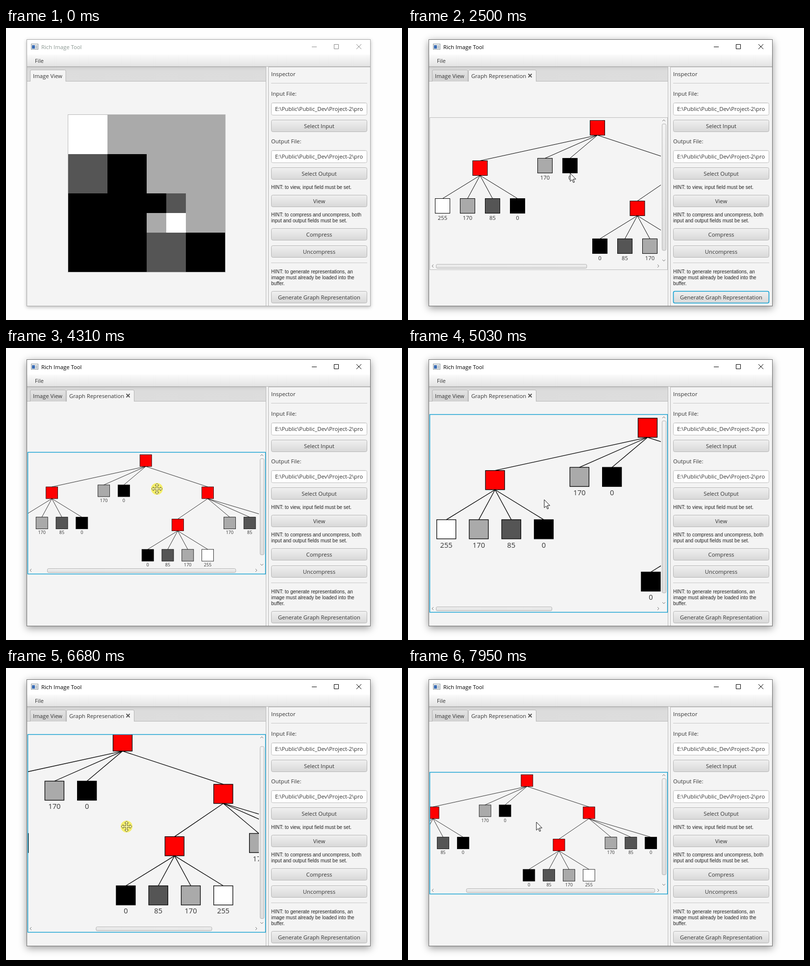
These frames come from a looping animation (808x595 px, 8000 ms). An HTML page:

```html
<!DOCTYPE html>
<html lang="en">
<head>
<meta charset="utf-8">
<title>Rich Image Tool</title>
<style>
  html, body { margin: 0; width: 100%; height: 100%; overflow: hidden; background: #fefefe; }
  #win { position: absolute; left: 42px; top: 23px; width: 702px; height: 544px; box-shadow: 0 2px 7px rgba(0,0,0,.27); }
  #win.active { box-shadow: 0 4px 15px rgba(0,0,0,.4); }
  svg { position: absolute; left: 0; top: 0; display: block; }
  text { font: 11.3px "Open Sans", "Noto Sans", sans-serif; fill: #333; white-space: pre; }
  .mid { text-anchor: middle; }
  .hint { font: 10px "Liberation Sans", Arial, sans-serif; fill: #222; }
  .edge { fill: none; stroke: #b7b7b7; }
  .thumb { fill: url(#thumb); stroke: #b4b4b4; }
  .tick { fill: none; stroke: #777; }
</style>
</head>
<body>
<div id="win"></div>
<svg id="stage" width="808" height="595" viewBox="0 0 808 595">
  <defs>
    <linearGradient id="menu" x2="0" y2="1"><stop stop-color="#fbfbfb"/><stop offset="1" stop-color="#e2e2e2"/></linearGradient>
    <linearGradient id="btn" x2="0" y2="1"><stop stop-color="#f0f0f0"/><stop offset="1" stop-color="#d8d8d8"/></linearGradient>
    <linearGradient id="hover" x2="0" y2="1"><stop stop-color="#f6f6f6"/><stop offset="1" stop-color="#e0e0e0"/></linearGradient>
    <linearGradient id="down" x2="0" y2="1"><stop stop-color="#dadada"/><stop offset="1" stop-color="#c5c5c5"/></linearGradient>
    <linearGradient id="tab" x2="0" y2="1"><stop stop-color="#e4e4e4"/><stop offset="1" stop-color="#d2d2d2"/></linearGradient>
    <linearGradient id="head" x2="0" y2="1"><stop stop-color="#d2d2d2"/><stop offset=".25" stop-color="#dcdcdc"/><stop offset="1" stop-color="#dddddd"/></linearGradient>
    <linearGradient id="thumb" x2="0" y2="1"><stop stop-color="#f2f2f2"/><stop offset="1" stop-color="#dedede"/></linearGradient>
    <clipPath id="field"><rect x="545" y="150" width="185.5" height="130"/></clipPath>
    <clipPath id="view"><rect id="viewBox" x="45" width="471"/></clipPath>
  </defs>

  <rect x="43" y="24" width="700" height="542" fill="#f4f4f4"/>
  <rect x="43" y="24" width="700" height="30" fill="#fff"/>
  <rect x="43" y="54" width="700" height="25" fill="url(#menu)"/>
  <path class="edge" d="M43 78.5H743"/>
  <rect x="51.5" y="32.5" width="14" height="11" fill="#f2f2f2" stroke="#8c979c"/>
  <rect x="53" y="35" width="6" height="7" fill="#3a6cb4"/>
  <rect x="60" y="35" width="4" height="7" fill="#c3cad0"/>
  <text id="title" x="72" y="43">Rich Image Tool</text>
  <path id="controls" fill="none" d="M624 38.5H634M669.5 33.5H678.5V42.5H669.5ZM715 33L725 43M725 33L715 43"/>
  <text x="59" y="71">File</text>

  <rect x="43" y="80" width="488" height="29" fill="url(#head)"/>
  <path class="edge" d="M43 108.5H531M43 79.5H531M530.5 79V566M535.5 79V566M535 79.5H743"/>
  <path id="tab1" d="M49.5 109V88Q49.5 85.5 52 85.5H119.5Q122 85.5 122 88V109" stroke="#b5b5b5"/>
  <text x="55" y="102">Image View</text>

  <g id="image"><rect x="126.5" y="176.5" width="321" height="321" fill="#aaa" stroke="#b9b9b9"/></g>

  <g id="graph">
    <path d="M123.5 109V88Q123.5 85.5 126 85.5H259Q261.5 85.5 261.5 88V109" fill="#f4f4f4" stroke="#b5b5b5"/>
    <text x="129" y="102">Graph Represenation</text>
    <path d="M245.5 93.5L252.5 100.5M252.5 93.5L245.5 100.5" stroke="#555" stroke-width="1.8"/>
    <g clip-path="url(#view)"><g id="tree"></g></g>
    <rect id="hThumb" class="thumb" height="8" rx="2.5"/>
    <rect id="vThumb" class="thumb" x="518.5" width="8" rx="2.5"/>
    <path id="ticks" class="tick"/>
    <rect id="pane" x="44.5" width="485" fill="none"/>
  </g>

  <g id="side"><path stroke="#c6c6c6" d="M541 112.5H737M541 478.5H737"/></g>
  <rect id="frame" x="42.5" y="23.5" width="701" height="543" fill="none"/>

  <g id="cursor">
    <circle id="halo" r="12" fill="#f5ee3c" opacity=".75"/>
    <path id="arrow" fill="#fff" stroke="#111" stroke-linejoin="round" d="M0 0V16.5L3.8 13L6.4 19L8.7 18L6.1 12H11.5Z"/>
    <path id="move" fill="#fbf7a2" stroke="#5a5632" stroke-width=".9" d="M0-11L4-7H1.5V-1.5H7V-4L11 0L7 4V1.5H1.5V7H4L0 11L-4 7H-1.5V1.5H-7V4L-11 0L-7-4V-1.5H-1.5V-7H-4Z"/>
  </g>
</svg>
<script>
const LOOP = 8000;
const $ = id => document.getElementById(id);

function add(parent, tag, attrs, content) {
  const el = document.createElementNS("http://www.w3.org/2000/svg", tag);
  set(el, attrs);
  if (content !== undefined) el.textContent = content;
  parent.appendChild(el);
  return el;
}
function set(el, attrs) {
  for (const k in attrs) el.setAttribute(k, attrs[k]);
}
const show = (el, on) => { el.style.display = on ? "" : "none"; };

// Inspector
const side = $("side");
function label(text, y) { add(side, "text", { x: 541, y }, text); }
function hint(y, ...lines) {
  lines.forEach((s, i) => add(side, "text", { x: 541, y: y + 12 * i, class: "hint" }, s));
}
function button(text, y) {
  add(side, "rect", { x: 541.5, y: y + 1.5, width: 195, height: 24, rx: 3, fill: "none", stroke: "#fff", opacity: .7 });
  const box = add(side, "rect", { x: 541.5, y: y + .5, width: 195, height: 24, rx: 3, fill: "url(#btn)", stroke: "#b5b5b5" });
  add(side, "text", { x: 639, y: y + 17, class: "mid" }, text);
  return box;
}
function field(y) {
  add(side, "rect", { x: 541.5, y: y + .5, width: 195, height: 25, rx: 3, fill: "#fff", stroke: "#bebebe" });
  add(side, "path", { d: `M543 ${y + 1.5}H735`, stroke: "#ececec" });
  add(side, "text", { x: 549, y: y + 17, "clip-path": "url(#field)" }, "E:\\Public\\Public_Dev\\Project-2\\pro");
}
label("Inspector", 98);
label("Input File:", 138);
field(152);
button("Select Input", 187);
label("Output File:", 235);
field(249);
button("Select Output", 284);
hint(328, "HINT: to view, input field must be set.");
button("View", 340);
hint(384, "HINT: to compress and uncompress, both", "input and output fields must be set.");
button("Compress", 408);
button("Uncompress", 443);
hint(500, "HINT: to generate representations, an", "image must already be loaded into the", "buffer.");
const generate = button("Generate Graph Representation", 536);

// Quadtree picture: column, row, width, height in 40 px cells
[[0, 0, 2, 2, "#fff"], [0, 2, 2, 2, "#555"], [2, 2, 2, 2, "#000"], [0, 4, 4, 4, "#000"],
 [4, 4, 1, 1, "#000"], [5, 4, 1, 1, "#555"], [5, 5, 1, 1, "#fff"],
 [4, 6, 2, 2, "#555"], [6, 6, 2, 2, "#000"]].forEach(([c, r, w, h, fill]) =>
  add($("image"), "rect", { x: 127 + 40 * c, y: 177 + 40 * r, width: 40 * w, height: 40 * h, fill }));

// Graph: a node is [x, children]; a leaf is [x, grey level]
const leaves = (x, ...levels) => levels.map((v, i) => [x + 51 * i, v]);
const ROOT = [0, [
  [-239.5, leaves(-316, 255, 170, 85, 0)],
  ...leaves(-107, 170, 0),
  [158, [[81.5, leaves(5, 0, 85, 170, 255)], ...leaves(214, 170, 85, 0)]],
]];
const tree = $("tree");
function drawNode([x, value], depth) {
  const inner = Array.isArray(value);
  const y = 20.4 + 82.05 * depth - (inner ? 0 : 5);
  if (inner) {
    for (const kid of value) {
      const kidY = drawNode(kid, depth + 1);
      add(tree, "path", { d: `M${x} ${y + 15}L${kid[0]} ${kidY - 15}`, stroke: "#000" });
    }
  } else {
    add(tree, "text", { x, y: y + 28.6, class: "mid" }, value);
  }
  add(tree, "rect", { x: x - 15, y: y - 15, width: 30, height: 30, stroke: "#000",
    fill: inner ? "#f00" : `rgb(${value},${value},${value})` });
  return y;
}
drawNode(ROOT, 0);

// Motion tables: [time, ...values]
const RUNS = [380, 1710, 2100, 2880, 3200, 4070, 5190, 6450, 7310, 7790];
const POINTER = [
  [380, 690, 588], [536, 675, 546], [2100, 675, 546], [2490, 331, 296], [3190, 331, 296],
  [3200, 335, 284], [3434, 323, 282], [3824, 270, 284], [4070, 270, 284], [4538, 345, 290],
  [4772, 278, 309], [5190, 278, 309], [5502, 487, 345], [5970, 94, 273], [6204, 34, 290],
  [6450, 34, 290], [6684, 246, 323], [6918, 330, 350], [7152, 262, 314]];
const SCROLL = [
  [3200, 0, 0], [3434, 12, 0], [3824, 66, 0], [4070, 66, 0], [4538, 0, 0], [5502, 0, 0],
  [5580, 64, 13], [5970, 383, 13], [6048, 417, 13], [6450, 417, 13], [6528, 388, 13],
  [6684, 251, 13], [6762, 220, 13], [6918, 160, 0]];
const ZOOM = [[0, 1], [2880, .9], [2960, .8], [4710, .9], [4790, 1], [4870, 1.1], [4950, 1.2],
  [5030, 1.3], [7310, 1.2], [7390, 1.1], [7550, 1], [7790, .9], [7870, .8]];
const DRAGS = [[3200, 3830], [4070, 4540], [5495, 6915]];

const last = (rows, t) => rows.filter(r => r[0] <= t).pop() || rows[0];
function tween(rows, t) {
  const a = last(rows, t);
  const b = rows[rows.indexOf(a) + 1];
  const k = b ? Math.max(0, (t - a[0]) / (b[0] - a[0])) : 0;
  return [1, 2].map(i => a[i] + (b ? (b[i] - a[i]) * k : 0));
}
function sample(t) {
  const start = RUNS.filter(r => r <= t).pop();
  return start === undefined ? t : start + Math.floor((t - start + 8) / 78) * 78;
}

function drawPane(t, tick) {
  const zoom = last(ZOOM, t)[1];
  const focus = t >= 3200;
  const w = 683 * zoom, h = 309 * zoom;
  const top = Math.round(337 - h / 2 - 1), height = Math.round(h + 2), bottom = top + height;
  const viewH = height - 15;
  const maxX = w - 471, maxY = h - viewH;
  let [sx, sy] = tween(SCROLL, tick);
  sx = Math.min(sx, maxX);
  sy = Math.min(sy, maxY);

  set($("pane"), { y: top + .5, height: height - 1, stroke: focus ? "#0f9fd0" : "#bdbdbd", "stroke-width": focus ? 1.4 : 1 });
  set($("viewBox"), { y: top + 1, height: viewH });
  set(tree, { transform: `translate(${45 + w / 2 - sx} ${top + 1 - sy}) scale(${zoom})` });

  const track = viewH - 26;
  const hLen = 447 * 471 / w, vLen = track * viewH / h;
  set($("hThumb"), { x: 57.5 + (447 - hLen) * sx / maxX, y: bottom - 11.5, width: hLen - 1 });
  set($("vThumb"), { y: top + 13.5 + (track - vLen) * sy / maxY, height: vLen - 1 });
  const m = bottom - 8;
  set($("ticks"), { d: `M52 ${m - 3}L49 ${m}L52 ${m + 3}M509 ${m - 3}L512 ${m}L509 ${m + 3}` +
    `M519 ${top + 8}L522 ${top + 5}L525 ${top + 8}M519 ${bottom - 21}L522 ${bottom - 18}L525 ${bottom - 21}` });
}

function render(t) {
  const tick = sample(t);
  const active = t >= 1710, graph = t >= 1870;
  $("win").className = active ? "active" : "";
  set($("frame"), { stroke: active ? "#6e6e6e" : "#aaaaaa" });
  $("title").style.fill = active ? "#000" : "#8b9892";
  set($("controls"), { stroke: active ? "#000" : "#8a8a8a" });

  const pressed = t >= 1710 && t < 1790;
  const hover = t >= 460 && t < 2178;
  const focus = active && t < 3200;
  set(generate, { fill: `url(#${pressed ? "down" : hover ? "hover" : "btn"})`,
    stroke: focus ? "#0f9fd0" : "#b5b5b5", "stroke-width": focus ? 1.6 : 1 });

  show($("image"), !graph);
  show($("graph"), graph);
  set($("tab1"), { fill: graph ? "url(#tab)" : "#f4f4f4" });
  if (graph) {
    drawPane(t, tick);
  }

  const drag = DRAGS.some(([a, b]) => t >= a && t < b);
  const [x, y] = tween(POINTER, tick);
  show($("cursor"), t >= 380);
  set($("cursor"), { transform: `translate(${Math.round(x)} ${Math.round(y)})` });
  show($("halo"), drag || (t >= 1710 && t < 1870));
  show($("move"), drag);
  show($("arrow"), !drag);
}

const begin = performance.now();
function loop() {
  render((performance.now() - begin) % LOOP);
  requestAnimationFrame(loop);
}
loop();
</script>
</body>
</html>
```
